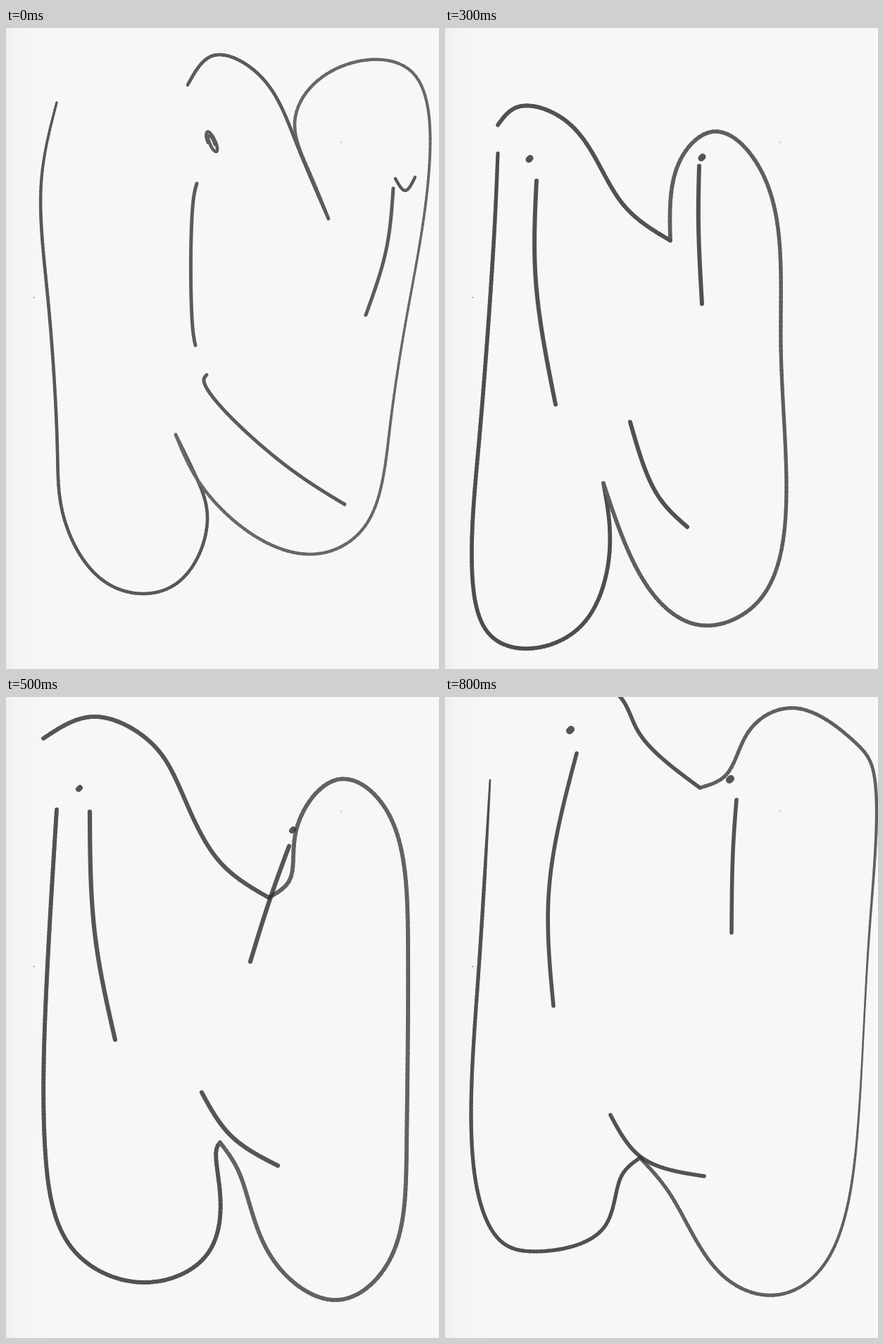
Write an HTML page with a canvas that moves like this. It is 615 px wide and 911 px high and loops after 0.9 s.

```html
<!DOCTYPE html>
<html lang="en">
<head>
<meta charset="utf-8">
<title>Wobbling letter</title>
<style>
html, body { margin: 0; width: 100%; height: 100%; overflow: hidden; background: #f7f7f7; }
canvas { display: block; width: 615px; height: 911px; filter: blur(0.5px); }
</style>
</head>
<body>
<canvas id="stage" width="615" height="911"></canvas>
<script>
const W = 615, H = 911, STEP = 100, SAMPLES = 180;
const ctx = document.getElementById("stage").getContext("2d");

const dot = (x, y) => [x - 1, y + 1, x + 1, y - 1];

// A shrinking tilted loop
function scribble(x, y) {
  return Array.from({ length: 14 }, (_, i) => {
    const a = Math.PI + i * 0.75, r = 1 - i * 0.04, u = 6 * r * Math.cos(a), v = 17 * r * Math.sin(a);
    return [x + u - 0.4 * -v, y + v];
  }).flat();
}

// Key points of each drawing. The outline runs from the left side (side) through
// the right lobe (lobe) to the head (head); "thin" is how far the pen pressure drops.
const poses = [
  {
    w: 4.6, tone: 92, thin: 0.25, eyeW: 4.5,
    side: [72,106, 50,220, 60,390, 73,600, 82,695, 145,790, 240,791, 286,700, 270,638, 241,578],
    lobe: [241,578, 276,648, 360,726, 445,747, 512,705, 545,570, 570,405, 601,200, 580,66, 517,45, 440,77, 410,135, 430,203, 458,271],
    head: [458,271, 411,160, 362,69, 295,39, 258,81],
    eyes: [scribble(293, 163), [553,214, 567,231, 581,212]],
    lines: [[271,221, 266,245, 265,425, 269,451], [550,228, 540,315, 511,408], [285,493, 281,500, 375,604, 481,677]]
  },
  {
    w: 6, tone: 86, thin: 0, eyeW: 9,
    side: [57,110, 27,350, 15,650, 22,710, 55,870, 135,927, 210,890, 235,800, 209,689],
    lobe: [209,689, 330,803, 445,865, 492,815, 514,580, 498,370, 472,190, 407,125, 378,142, 367,210, 376,290],
    head: [376,290, 300,172, 220,82, 120,48, 50,69],
    eyes: [dot(88, 112), dot(313, 156)],
    lines: [[92,140, 98,235, 113,324], [330,165, 335,225, 337,288], [252,539, 279,588, 324,621]]
  },
  {
    w: 5.6, tone: 82, thin: 0.08, eyeW: 9,
    side: [75,178, 70,290, 49,580, 38,750, 60,858, 115,882, 195,848, 234,740, 225,647],
    lobe: [225,647, 292,800, 365,849, 445,815, 484,690, 477,450, 457,220, 385,147, 333,190, 320,302],
    head: [320,302, 250,247, 180,139, 104,112, 75,138],
    eyes: [dot(120, 186), dot(365, 184)],
    lines: [[130,217, 129,360, 157,535], [361,196, 360,280, 365,392], [263,560, 302,664, 344,709]]
  },
  {
    w: 5.8, tone: 86, thin: 0, eyeW: 8,
    side: [72,160, 58,400, 56,650, 95,785, 195,832, 285,793, 304,705, 299,642, 304,633],
    lobe: [304,633, 332,678, 375,793, 470,857, 545,800, 569,640, 571,350, 540,160, 472,117, 412,190, 403,260, 373,285],
    head: [373,285, 300,230, 245,125, 205,64, 125,28, 53,59],
    eyes: [dot(104, 130), dot(407, 189)],
    lines: [[119,163, 126,335, 155,487], [402,212, 374,290, 347,376], [278,562, 320,624, 386,666]]
  },
  {
    w: 5, tone: 86, thin: 0, eyeW: 8,
    side: [39,105, 25,400, 10,620, 27,792, 108,854, 190,812, 213,725, 225,690],
    lobe: [225,690, 262,722, 340,811, 455,866, 535,831, 554,720, 538,420, 517,175, 443,61, 410,105, 402,160, 363,177],
    head: [363,177, 285,140, 205,15, 150,-5, 78,42],
    eyes: [dot(118, 55), dot(388, 122)],
    lines: [[135,111, 116,270, 146,414], [401,137, 378,245, 387,300], [228,648, 270,718, 364,758]]
  },
  {
    w: 5.2, tone: 84, thin: 0.5, eyeW: 10,
    side: [64,118, 47,400, 43,685, 80,774, 130,788, 225,755, 250,682, 277,655],
    lobe: [277,655, 322,710, 390,818, 470,850, 543,800, 588,590, 603,330, 607,100, 582,64, 500,16, 432,48, 400,110, 362,129],
    head: [362,129, 275,50, 249,0, 150,-50],
    eyes: [dot(178, 47), dot(405, 117)],
    lines: [[187,80, 148,270, 154,439], [414,146, 409,220, 407,335], [235,594, 280,655, 368,681]]
  }
];

const mix = (a, b, t) => a + (b - a) * t;

// Natural cubic spline through values v at knots t
function spline(t, v) {
  const n = t.length - 1, c = [0], d = [0], m = Array(n + 1).fill(0);
  for (let i = 1; i < n; i++) {
    const h = t[i] - t[i - 1], g = t[i + 1] - t[i], k = 2 * (h + g) - h * c[i - 1];
    c[i] = g / k;
    d[i] = (6 * ((v[i + 1] - v[i]) / g - (v[i] - v[i - 1]) / h) - h * d[i - 1]) / k;
  }
  for (let i = n - 1; i > 0; i--) m[i] = d[i] - c[i] * m[i + 1];
  return (i, s) => {
    const h = t[i + 1] - t[i], r = 1 - s;
    return r * v[i] + s * v[i + 1] + h * h / 6 * ((r ** 3 - r) * m[i] + (s ** 3 - s) * m[i + 1]);
  };
}

// Samples a curve at equal steps of its length; pen(u) adds width and tone.
function sample(pts, pen) {
  const xs = pts.filter((_, i) => i % 2 === 0), ys = pts.filter((_, i) => i % 2);
  const knots = [0];
  for (let i = 1; i < xs.length; i++) {
    knots.push(knots[i - 1] + Math.hypot(xs[i] - xs[i - 1], ys[i] - ys[i - 1]) ** 0.6);
  }
  const fx = spline(knots, xs), fy = spline(knots, ys), fine = [];
  for (let i = 0; i < xs.length - 1; i++) {
    for (let j = i ? 1 : 0; j <= 24; j++) {
      const x = fx(i, j / 24), y = fy(i, j / 24), p = fine[fine.length - 1];
      fine.push({ x, y, s: p ? p.s + Math.hypot(x - p.x, y - p.y) : 0 });
    }
  }
  const total = fine[fine.length - 1].s;
  let k = 1;
  return Array.from({ length: SAMPLES + 1 }, (_, i) => {
    const u = i / SAMPLES, s = u * total;
    while (k < fine.length - 1 && fine[k].s < s) k++;
    const a = fine[k - 1], b = fine[k], t = (s - a.s) / (b.s - a.s || 1);
    return { x: mix(a.x, b.x, t), y: mix(a.y, b.y, t), ...pen(u) };
  });
}

function build({ w, tone, thin, eyeW, side, lobe, head, eyes, lines }) {
  const startLight = u => ({ w: w * (1 - thin * Math.max(0, 1 - 6 * u)), tone: tone - 4 });
  const middleLight = u => ({ w: w * (1 - thin * Math.sin(Math.PI * u) ** 4), tone: tone + 12 });
  const even = width => () => ({ w: width, tone });
  return {
    outline: [sample(side, startLight), sample(lobe, middleLight), sample(head, even(w))],
    marks: [...eyes.map(e => sample(e, even(eyeW))), ...lines.map(l => sample(l, even(w + 0.4)))]
  };
}

function between(a, b) {
  const half = (p, q) => ({
    x: mix(p.x, q.x, 0.5), y: mix(p.y, q.y, 0.5), w: mix(p.w, q.w, 0.5), tone: mix(p.tone, q.tone, 0.5)
  });
  const blend = key => a[key].map((s, i) => s.map((p, j) => half(p, b[key][i][j])));
  return { outline: blend("outline"), marks: blend("marks") };
}

const [lean, tall, narrow, broad, high, wide] = poses.map(build);
const cels = [lean, between(lean, tall), tall, narrow, between(narrow, broad), broad, high, between(high, wide), wide];

function paper() {
  const g = ctx.createLinearGradient(0, 0, 60, 0);
  g.addColorStop(0, "#eeeeee");
  g.addColorStop(0.2, "#f4f4f4");
  g.addColorStop(1, "#f7f7f7");
  ctx.fillStyle = g;
  ctx.fillRect(0, 0, W, H);
  speck(39.5, 383, 1, "#999");
  speck(476, 162.5, 2, "#dedede");
}

function speck(x, y, r, color) {
  ctx.fillStyle = color;
  ctx.beginPath();
  ctx.arc(x, y, r, 0, Math.PI * 2);
  ctx.fill();
}

function outlineStroke(pts) {
  for (let i = 1; i < pts.length; i++) {
    const a = pts[i - 1], b = pts[i], c = Math.round(b.tone);
    ctx.strokeStyle = `rgb(${c},${c},${c})`;
    ctx.lineWidth = b.w;
    ctx.beginPath();
    ctx.moveTo(a.x, a.y);
    ctx.lineTo(b.x, b.y);
    ctx.stroke();
  }
}

// Translucent ink, so crossings get darker
function markStroke(pts) {
  const c = Math.round((pts[0].tone - 50) / 0.8);
  ctx.strokeStyle = `rgba(${c},${c},${c},0.8)`;
  ctx.lineWidth = pts[0].w;
  ctx.beginPath();
  pts.forEach(p => ctx.lineTo(p.x, p.y));
  ctx.stroke();
}

function tick() {
  const cel = cels[Math.floor(performance.now() / STEP) % cels.length];
  ctx.lineCap = ctx.lineJoin = "round";
  paper();
  cel.outline.forEach(outlineStroke);
  cel.marks.forEach(markStroke);
  requestAnimationFrame(tick);
}
tick();
</script>
</body>
</html>
```
